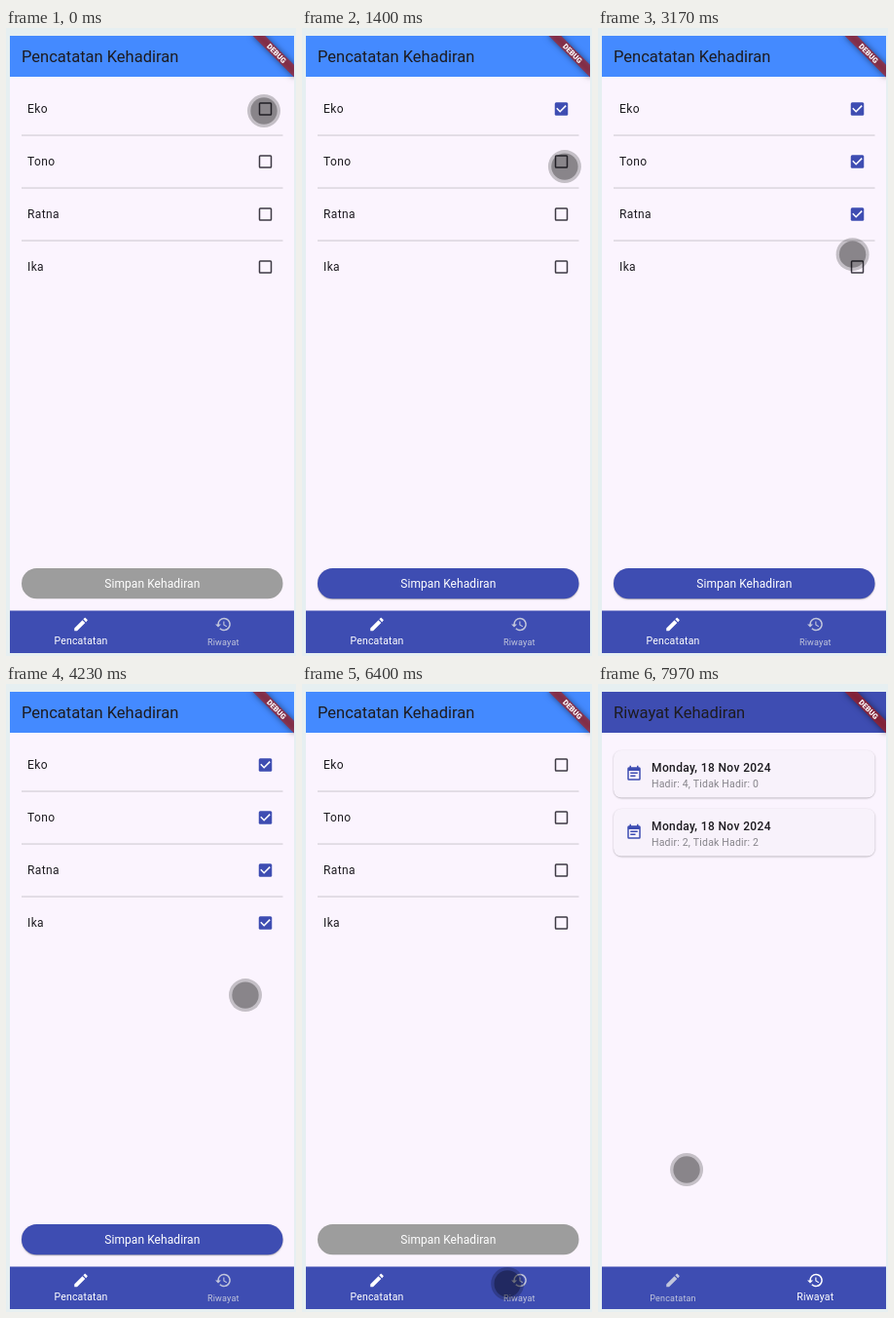
Write an HTML page with a canvas that moves like this. It is 298 px wide and 644 px high and loops after 8 s.

```html
<!DOCTYPE html>
<html lang="id">
<head>
<meta charset="utf-8">
<title>Pencatatan Kehadiran</title>
<style>
  html, body { margin: 0; width: 100%; height: 100%; overflow: hidden; background: #e6eff1; }
  canvas { display: block; width: 100vw; height: 100vh; }
</style>
</head>
<body>
<canvas id="stage"></canvas>
<script>
const W = 298, H = 644, LOOP = 8000;
const canvas = document.getElementById('stage');
const ctx = canvas.getContext('2d');

const INDIGO = [62, 77, 178], GREY = [157, 157, 157], DIM = [194, 198, 220], WHITE = [255, 255, 255];
const PAGE = '#fbf4fe', BLUE = '#448aff', INK = '#1d1b20';
const ROWS = ['Eko', 'Tono', 'Ratna', 'Ika'];
const CHECKED_AT = [480, 1600, 2500, 3550];
const SAVED_AT = 5520, SWITCH_AT = 6900;

// Pointer stops: time, x, y
const POINTER = [
  [0, 265, 85], [750, 266, 86], [1300, 270, 142], [1850, 269, 143],
  [2300, 267, 195], [2700, 266, 196], [3300, 261, 237], [3900, 262, 240],
  [4950, 194, 576], [5700, 194, 576], [6350, 211, 615], [6750, 215, 615],
  [7330, 215, 615], [7980, 91, 498]
];

const EDIT = new Path2D('M3 17.25V21h3.75L17.81 9.94l-3.75-3.75L3 17.25zM20.71 7.04c.39-.39.39-1.02 0-1.41l-2.34-2.34c-.39-.39-1.02-.39-1.41 0l-1.83 1.83 3.75 3.75 1.83-1.83z');
const HISTORY = new Path2D('M13 3a9 9 0 0 0-9 9H1l3.89 3.89.07.14L9 12H6a7 7 0 1 1 2.06 4.94l-1.42 1.42A9 9 0 1 0 13 3zm-1 5v5l4.28 2.54.72-1.21-3.5-2.08V8H12z');
const NOTE = new Path2D('M17 10H7v2h10v-2zm2-7h-1V1h-2v2H8V1H6v2H5a2 2 0 0 0-2 2v14a2 2 0 0 0 2 2h14a2 2 0 0 0 2-2V5a2 2 0 0 0-2-2zm0 16H5V8h14v11zm-5-5H7v2h7v-2z');

const clamp = v => Math.max(0, Math.min(1, v));
const ease = v => v * v * (3 - 2 * v);
const progress = (t, start, length = 200) => ease(clamp((t - start) / length));
const lerp = (a, b, k) => a + (b - a) * k;
const rgb = c => `rgb(${c.map(Math.round).join(',')})`;
const mix = (a, b, k) => rgb(a.map((v, i) => lerp(v, b[i], k)));

function rect(x, y, w, h, color) {
  ctx.fillStyle = color;
  ctx.fillRect(x, y, w, h);
}

function roundRect(x, y, w, h, r) {
  ctx.beginPath();
  ctx.roundRect(x, y, w, h, r);
}

function text(str, x, y, size, color, { weight = 400, spacing = 0, align = 'left' } = {}) {
  ctx.font = `${weight} ${size}px Roboto, sans-serif`;
  ctx.letterSpacing = spacing + 'px';
  ctx.textAlign = align;
  ctx.fillStyle = color;
  ctx.fillText(str, x, y);
}

function icon(path, cx, cy, color) {
  ctx.save();
  ctx.translate(cx - 9, cy - 9);
  ctx.scale(0.75, 0.75);
  ctx.fillStyle = color;
  ctx.fill(path);
  ctx.restore();
}

function shadow(color, blur, dy) {
  // Shadow metrics ignore the canvas transform
  const k = canvas.width / W;
  ctx.shadowColor = color;
  ctx.shadowBlur = blur * k;
  ctx.shadowOffsetY = dy * k;
}

function checkbox(cx, cy, on) {
  const s = 13.5, x = cx - s / 2, y = cy - s / 2;
  const fill = clamp(on * 2), tick = clamp(on * 2 - 1);
  const edge = lerp(1.5, s / 2, fill);
  ctx.fillStyle = mix([62, 58, 68], INDIGO, fill);
  roundRect(x, y, s, s, 1.5);
  if (fill < 1) ctx.rect(x + edge, y + edge, s - 2 * edge, s - 2 * edge);
  ctx.fill('evenodd');
  if (!tick) return;
  const first = clamp(tick * 2), second = clamp(tick * 2 - 1);
  ctx.strokeStyle = '#fff';
  ctx.lineWidth = 1.5;
  ctx.beginPath();
  ctx.moveTo(x + s * 0.15, y + s * 0.45);
  ctx.lineTo(x + s * lerp(0.15, 0.4, first), y + s * lerp(0.45, 0.7, first));
  if (second) ctx.lineTo(x + s * lerp(0.4, 0.85, second), y + s * lerp(0.7, 0.25, second));
  ctx.stroke();
}

function attendance(t) {
  const cleared = progress(t, SAVED_AT);
  ROWS.forEach((name, i) => {
    const y = 83 + i * 54;
    text(name, 22, y + 4.2, 12, INK, { spacing: 0.375 });
    checkbox(266.5, y, progress(t, CHECKED_AT[i]) * (1 - cleared));
    if (i < 3) rect(16, y + 26.4, 268.5, 1.3, '#d6d2da');
  });
  const active = progress(t, CHECKED_AT[0]) * (1 - cleared);
  ctx.save();
  shadow(`rgba(0,0,0,${0.35 * active})`, 1.6, 0.7);
  ctx.fillStyle = mix(GREY, INDIGO, active);
  roundRect(16, 554, 268.5, 31.3, 15.65);
  ctx.fill();
  ctx.restore();
  text('Simpan Kehadiran', 150.3, 574, 12, '#fff', { spacing: 0.075, align: 'center' });
}

function card(y, present, absent) {
  ctx.save();
  shadow('rgba(0,0,0,.3)', 1.8, 0.7);
  ctx.fillStyle = '#f8f2fb';
  roundRect(16, y, 268.5, 48.5, 8);
  ctx.fill();
  ctx.restore();
  icon(NOTE, 37, y + 24, rgb(INDIGO));
  text('Monday, 18 Nov 2024', 55, y + 22, 12, INK, { weight: 500, spacing: 0.375 });
  text(`Hadir: ${present}, Tidak Hadir: ${absent}`, 55, y + 38.4, 10.5, '#86848a', { spacing: 0.19 });
}

function tab(label, path, cx, on) {
  const color = mix(DIM, WHITE, on);
  icon(path, cx, 611.5, color);
  text(label, cx, lerp(633, 632, on), lerp(9, 10.5, on), color, { spacing: 0.19, align: 'center' });
}

function banner() {
  ctx.save();
  ctx.translate(296, 8);
  ctx.rotate(Math.PI / 4);
  ctx.scale(0.75, 0.75);
  ctx.save();
  shadow('rgba(0,0,0,.8)', 5.9, 0);
  rect(-40, 28, 80, 12, 'rgba(183,28,28,.63)');
  ctx.restore();
  text('DEBUG', 0, 37.6, 10.2, '#fff', { weight: 900, align: 'center' });
  ctx.restore();
}

function pointerAt(t) {
  const i = POINTER.findIndex(p => p[0] > t);
  if (i < 0) return POINTER[POINTER.length - 1].slice(1);
  const [t0, x0, y0] = POINTER[i - 1], [t1, x1, y1] = POINTER[i];
  const k = ease((t - t0) / (t1 - t0));
  return [lerp(x0, x1, k), lerp(y0, y1, k)];
}

function disc(x, y, r, color) {
  ctx.fillStyle = color;
  ctx.beginPath();
  ctx.arc(x, y, r, 0, Math.PI * 2);
  ctx.fill();
}

function pointer(t) {
  const [x, y] = pointerAt(t);
  disc(x, y, 17, 'rgba(0,0,0,.22)');
  disc(x, y, 13.7, 'rgba(0,0,0,.3)');
}

function draw(t) {
  const history = t >= SWITCH_AT;
  const switched = progress(t, SWITCH_AT);
  rect(0, 0, W, H, '#e6eff1');
  ctx.save();
  ctx.beginPath();
  ctx.rect(4, 8, 292, 633);
  ctx.clip();
  rect(4, 8, 292, 633, PAGE);
  rect(4, 8, 292, 42, history ? rgb(INDIGO) : BLUE);
  text(history ? 'Riwayat Kehadiran' : 'Pencatatan Kehadiran', 16, 34.6, 16.5, INK);
  if (history) {
    card(68, 4, 0);
    card(128, 2, 2);
  } else {
    attendance(t);
  }
  rect(4, 597.5, 292, 43.5, rgb(INDIGO));
  tab('Pencatatan', EDIT, 77, 1 - switched);
  tab('Riwayat', HISTORY, 223.3, switched);
  banner();
  ctx.restore();
  pointer(t);
}

function resize() {
  const ratio = window.devicePixelRatio || 1;
  canvas.width = Math.round(innerWidth * ratio);
  canvas.height = Math.round(innerHeight * ratio);
}

const start = performance.now();
function frame() {
  ctx.setTransform(canvas.width / W, 0, 0, canvas.height / H, 0, 0);
  draw((performance.now() - start) % LOOP);
  requestAnimationFrame(frame);
}

addEventListener('resize', resize);
resize();
frame();
</script>
</body>
</html>
```
